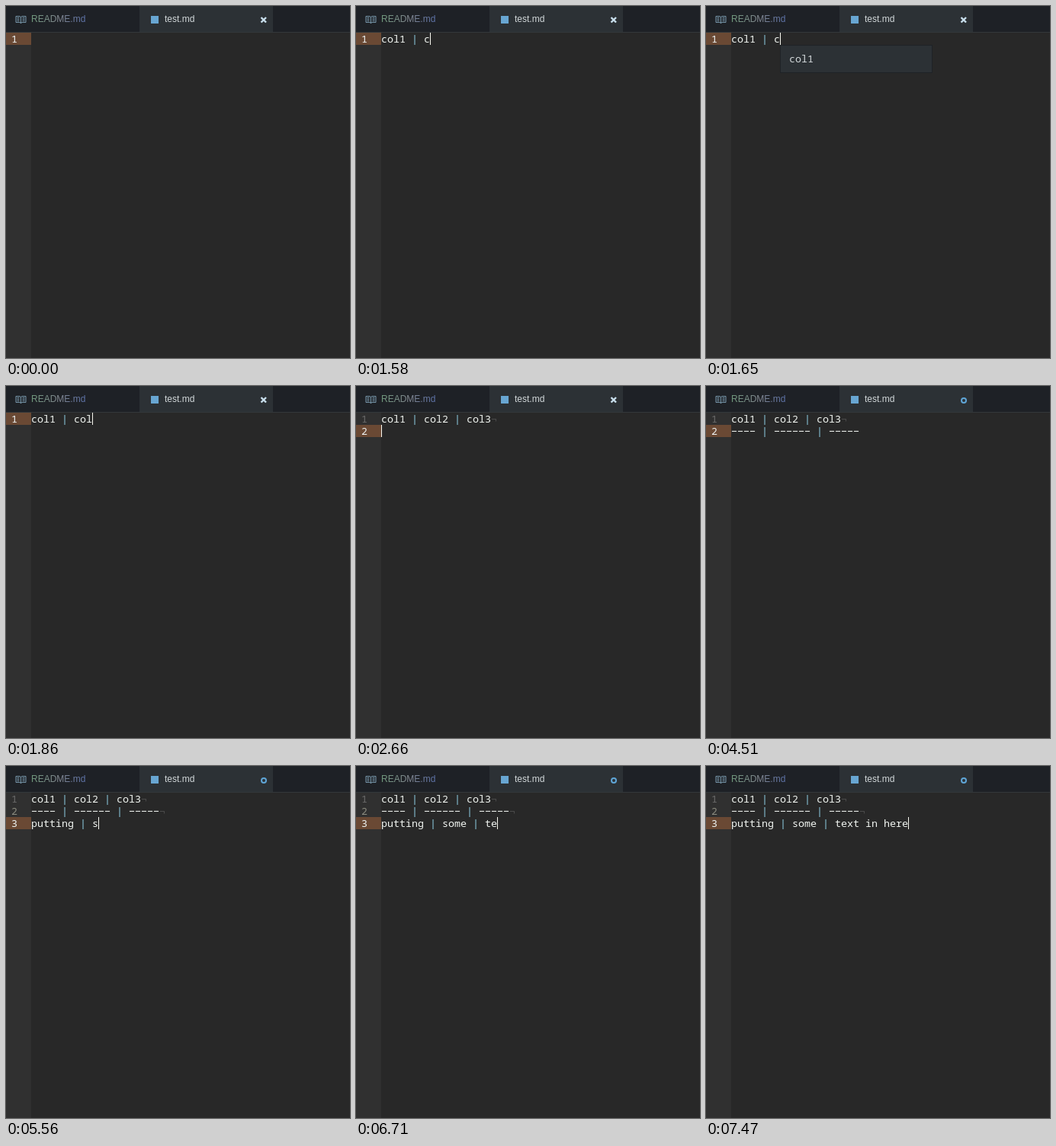
Animation, 451 px wide and 462 px high, one loop 8000 ms. Source, as an HTML page with a canvas:

```html
<!DOCTYPE html>
<html lang="en">
<head>
<meta charset="utf-8">
<title>Typing a table</title>
<style>
html, body { margin: 0; width: 100%; height: 100%; overflow: hidden; background: #282828; }
canvas { display: block; }
</style>
</head>
<body>
<canvas id="stage" width="451" height="462"></canvas>
<script>
const ctx = document.getElementById('stage').getContext('2d');
const LOOP = 8000, LEFT = 33, TOP = 35, CELL = 8, ROW = 16;
const CODE_FONT = '13.333px "Noto Sans Mono", monospace';
const TAB_FONT = '12px "Liberation Sans", Arial, sans-serif';
const MODIFIED_AT = 2720;

// Each step: start time, then an edit: typed text, or "<" to erase one character first.
const STEPS = [
  [540, 'c'], [620, 'o'], [690, 'l'], [870, '1'], [930, ' '], [1210, '|'], [1370, ' '],
  [1580, 'c'], [1790, 'ol'],
  [2000, '2'], [2060, ' '], [2120, '| '], [2180, 'co'], [2240, 'l2'], [2460, '<3'],
  [2660, '\n'], [2950, '--'], [3020, '--'], [3340, ' '],
  [3580, '|'], [3630, ' '], [3690, '--'], [3760, '---'], [3820, '- '],
  [4120, '|'], [4210, ' --'], [4300, '---'], [4590, '\n'],
  [4840, 'putt'], [4900, 'ing'], [5110, ' '], [5230, '|'], [5490, ' '], [5560, 's'],
  [5840, 'ome'], [6100, ' '], [6310, '|'], [6370, ' '],
  [6710, 'te'], [6780, 'xt'], [6850, ' in'], [6910, ' he'], [6980, 're']
];
const CURSOR_OFF = [[0, 460], [4510, 4590], [7430, 7470]];
const POPUP = [1650, 1860];

const within = (t, [from, to]) => t >= from && t < to;

function textAt(t) {
  let text = '';
  for (const [start, edit] of STEPS) {
    if (start > t) break;
    text = edit[0] === '<' ? text.slice(0, -1) + edit.slice(1) : text + edit;
  }
  return text;
}

function box(x, y, w, h, color) {
  ctx.fillStyle = color;
  ctx.fillRect(x, y, w, h);
}

function write(text, x, y, color, font = CODE_FONT) {
  ctx.font = font;
  ctx.fillStyle = color;
  ctx.fillText(text, x, y);
}

function line(points, color, width) {
  ctx.beginPath();
  points.forEach(([x, y]) => ctx.lineTo(x, y));
  ctx.strokeStyle = color;
  ctx.lineWidth = width;
  ctx.stroke();
}

function drawBook() {
  const color = '#7898ac';
  for (const side of [-1, 1]) {
    const at = (dx, y) => [19.5 + side * dx, y];
    line([at(0, 14.5), at(1.5, 13.5), at(6.5, 13.5), at(6.5, 21.5), at(1.5, 21.5), at(0, 22.5)], color, 1);
    for (const y of [15.5, 17.5, 19.5]) line([at(2, y), at(5, y)], color, 1);
  }
  line([[19.5, 14], [19.5, 23]], color, 1);
}

function drawTabs(modified) {
  box(0, 0, 451, 34, '#1e2126');
  box(175, 0, 175, 34, '#2c3135');
  box(0, 34, 451, 1, '#33383b');
  drawBook();
  const tint = ctx.createLinearGradient(33, 0, 105, 0);
  tint.addColorStop(0, '#6f9a7c');
  tint.addColorStop(0.5, '#82878f');
  tint.addColorStop(1, '#5a70a8');
  write('README.md', 33, 21, tint, TAB_FONT);
  box(190, 13, 10, 10, '#68a6d2');
  write('test.md', 208, 21, '#d2d8da', TAB_FONT);
  if (modified) {
    ctx.beginPath();
    ctx.arc(338, 19, 3, 0, Math.PI * 2);
    ctx.strokeStyle = '#5fa5d6';
    ctx.lineWidth = 2;
    ctx.stroke();
  } else {
    line([[334.5, 15], [341, 21.5]], '#c9dfed', 2.4);
    line([[341, 15], [334.5, 21.5]], '#c9dfed', 2.4);
  }
}

function drawRow(row, index, last) {
  const y = TOP + index * ROW, base = y + 13;
  if (last) box(0, y, LEFT, ROW, '#6a4934');
  write(index + 1, 7, base, last ? '#eef4f4' : index ? '#8c8c80' : '#6a6a6a');
  const rule = /^-{3,}\s*$/.test(row);
  [...row].forEach((char, col) => {
    const color = rule ? '#7d7d78' : char === '|' ? '#93d3ea' : '#f2f6f2';
    write(char === '-' ? '\u2212' : char, LEFT + col * CELL, base, color);
  });
  const end = LEFT + row.length * CELL;
  if (row.endsWith(' ')) write('\u00b7', end - CELL, base, '#585858');
  if (!last) write('\u00ac', end, base, '#505050');
}

function drawPopup(x, y) {
  box(x, y, 200, 37, '#1e2226');
  box(x + 1, y + 1, 198, 35, '#2c3135');
  write('col1', x + 12, y + 23, '#d2d8da');
}

function draw(t) {
  box(0, 35, 451, 427, '#282828');
  box(0, 35, LEFT, 427, '#303030');
  drawTabs(t >= MODIFIED_AT);
  const rows = textAt(t).split('\n'), last = rows.length - 1;
  rows.forEach((row, i) => drawRow(row, i, i === last));
  const x = LEFT + rows[last].length * CELL, y = TOP + last * ROW;
  if (!CURSOR_OFF.some(span => within(t, span))) box(x, y, 1, ROW, '#f8f8f0');
  if (within(t, POPUP)) drawPopup(x, y + ROW);
}

const origin = performance.now();
function tick() {
  draw((performance.now() - origin) % LOOP);
  requestAnimationFrame(tick);
}
tick();
</script>
</body>
</html>
```
